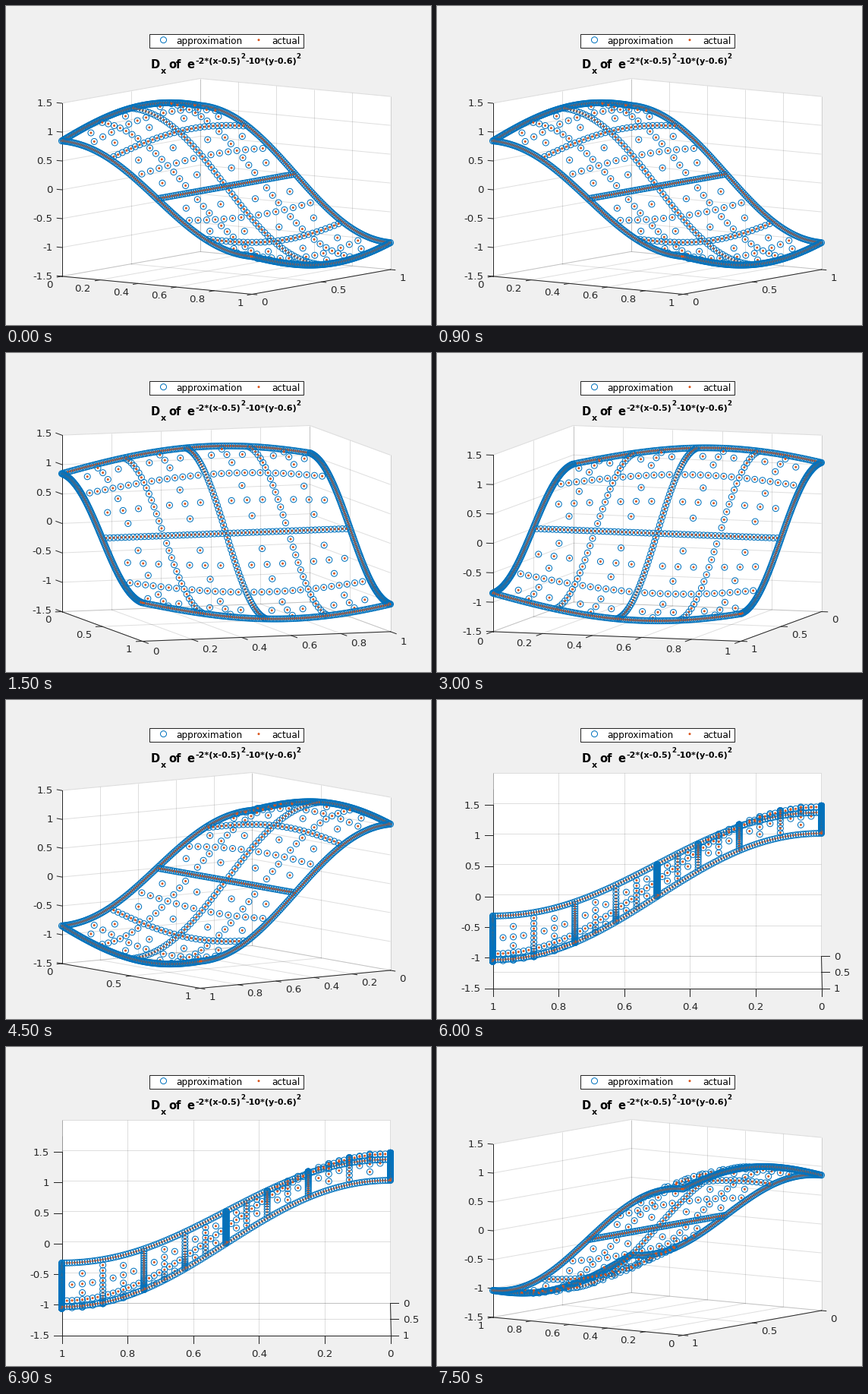
Write a matplotlib script that moves like this. It is 560 by 420 pixels and loops after 8000 ms.

```python
import numpy as np
import matplotlib.pyplot as plt
from matplotlib.animation import FuncAnimation
from matplotlib.collections import LineCollection, PathCollection, PolyCollection
from matplotlib.patches import Rectangle
from matplotlib.path import Path
from matplotlib.transforms import IdentityTransform

W, H, DPI = 560, 420, 100
PX = 72 / DPI                       # one pixel in points
LEFT, RIGHT, TOP, BOTTOM = 73.5, 506.5, 95.5, 379.5
ELEV = np.radians(10)
BLUE, ORANGE, DARK = "#0072BD", "#D95319", "#262626"
LEVEL = 7
CORNERS = np.array([(0, 0), (1, 0), (1, 1), (0, 1)], float)
Z_TICKS = np.arange(-1.5, 1.6, 0.5)

plt.rcParams["font.family"] = "DejaVu Sans"


def sparse_grid(level):
    """Nodes of the regular sparse grid on the unit square."""
    parts = []
    for a in range(level + 1):
        x = np.linspace(0, 1, 2**a + 1)
        y = np.linspace(0, 1, 2**(level - a) + 1)
        parts.append(np.stack(np.meshgrid(x, y), -1).reshape(-1, 2))
    return np.unique(np.vstack(parts), axis=0)


def surface(x, y):
    return -4 * (x - 0.5) * np.exp(-2 * (x - 0.5)**2 - (y - 0.6)**2)


nodes = sparse_grid(LEVEL)
heights = surface(nodes[:, 0], nodes[:, 1])


def project(az, xy, z):
    """Orthographic view stretched to fill the plot box: pixels and nearness."""
    c, s = np.cos(az), np.sin(az)
    span = abs(c) + abs(s)
    u = np.asarray(xy, float) - 0.5
    z = np.asarray(z, float) / 3
    across = (u[..., 0] * c + u[..., 1] * s) / span
    away = -u[..., 0] * s + u[..., 1] * c
    up = np.sin(ELEV) * away + np.cos(ELEV) * z
    tall = np.sin(ELEV) * span + np.cos(ELEV)
    px = (LEFT + RIGHT) / 2 + (RIGHT - LEFT) * across
    py = (TOP + BOTTOM) / 2 - (BOTTOM - TOP) * up / tall
    near = np.sin(ELEV) * z - np.cos(ELEV) * away
    return np.stack([px, py], -1), near


fig = plt.figure(figsize=(W / DPI, H / DPI), dpi=DPI, facecolor="#F0F0F0")
ax = fig.add_axes([0, 0, 1, 1])
ax.axis("off")
ax.set_xlim(0, W)
ax.set_ylim(H, 0)


def text(x, y, s, size, **kw):
    return ax.text(x, y, s, fontsize=size * PX, va="baseline", **kw)


def markers(offsets, zorder):
    """Alternating open circles and dots."""
    col = PathCollection(
        [Path.circle((0, 0), 4), Path.circle((0, 0), 1.5)],
        offsets=offsets, offset_transform=ax.transData,
        facecolors=["none", ORANGE], edgecolors=[BLUE, "none"],
        linewidths=[PX, 0], zorder=zorder)
    col.set_transform(IdentityTransform())
    ax.add_collection(col, autolim=False)
    return col


walls = PolyCollection([], facecolors="white", edgecolors="white",
                       linewidths=0.5, zorder=1)
grid = LineCollection([], colors=[(0.15, 0.15, 0.15, 0.15)],
                      linewidths=PX, zorder=2)
axes_lines = LineCollection([], colors=DARK, linewidths=PX, zorder=3,
                            capstyle="projecting")
for col in (walls, grid, axes_lines):
    ax.add_collection(col, autolim=False)
cloud = markers(np.zeros((2, 2)), 4)

# legend
ax.add_patch(Rectangle((188.5, 36.5), 203, 18, fc="white", ec=DARK,
                       lw=PX, zorder=5))
markers([(207.5, 44.7), (333, 44.7)], 6)
text(224.5, 49.6, "approximation", 12, zorder=6)
text(350.5, 49.6, "actual", 12, zorder=6)

# title
for x, y, s, size in [
        (190.5, 82, "D", 14.67), (203.7, 89.4, "x", 11.1),
        (214, 82, "of", 14.67), (238.5, 82, "e", 14.67),
        (249.5, 76, "-2*(x-0.5)", 11.1), (309.6, 69.2, "2", 8.7),
        (315.7, 76, "-10*(y-0.6)", 11.1), (382.8, 69.2, "2", 8.7)]:
    text(x, y, s, size, weight="bold", zorder=6)

labels = []


def label(x, y, value, ha):
    labels.append(text(x, y + 4.8, f"{value:g}", 13.33, ha=ha,
                       color=DARK, zorder=3))


def tick_values(length):
    return np.linspace(0, 1, 6) if length > 200 else np.linspace(0, 1, 3)


def draw_box(az, quadrant):
    def pt(xy, z):
        return project(az, xy, z)[0]

    left, front, right, back = (CORNERS[(quadrant + i) % 4] for i in range(4))
    lo = [pt(c, -1.5) for c in (left, front, right, back)]
    hi = [pt(c, 1.5) for c in (left, front, right, back)]
    walls.set_verts([lo, [lo[0], lo[3], hi[3], hi[0]],
                     [lo[3], lo[2], hi[2], hi[3]]])

    sides = [np.hypot(*(lo[1] - lo[0])), np.hypot(*(lo[2] - lo[1]))]
    size = 0.025 * max(*sides, lo[0][1] - hi[0][1])
    lines = [[pt(a, z), pt(b, z)] for z in Z_TICKS
             for a, b in ((left, back), (back, right))]
    dark = [[lo[0], lo[1]], [lo[1], lo[2]], [lo[0], hi[0]]]

    def tick(p, direction):
        end = p + size * direction / np.hypot(*direction)
        dark.append([p, end])
        return end

    # floor axes: start, end, the shift to the far side, outward direction
    for start, stop, shift, out, length, side in [
            (left, front, right - front, lo[1] - lo[2], sides[0], -1),
            (front, right, left - front, lo[1] - lo[0], sides[1], 1)]:
        for t in tick_values(length):
            base = start + t * (stop - start)
            far = base + shift
            lines.append([pt(base, -1.5), pt(far, -1.5)])
            lines.append([pt(far, -1.5), pt(far, 1.5)])
            x, y = tick(pt(base, -1.5), out)
            value = base[0] if start[0] != stop[0] else base[1]
            if abs(out[0]) < 1:
                label(x, y + 13, value, "center")
            else:
                drop = 0 if abs(out[1]) < 1 else 9.5
                label(x + side * 5.5, y + drop, value,
                      "left" if side > 0 else "right")

    for z in Z_TICKS:
        x, y = tick(pt(left, z), lo[0] - lo[1])
        label(x - 5.5, y, z, "right")

    grid.set_segments(lines)
    axes_lines.set_segments(dark)


def update(frame):
    while labels:
        labels.pop().remove()
    degrees = 36 * (frame // 3 + 1)
    az = np.radians(degrees)
    draw_box(az, degrees // 90)
    pts, near = project(az, nodes, heights)
    cloud.set_offsets(np.repeat(pts[np.argsort(near, kind="stable")], 2, axis=0))
    return []


anim = FuncAnimation(fig, update, frames=16, interval=500,
                     init_func=lambda: update(0), repeat=True)
plt.show()
```
